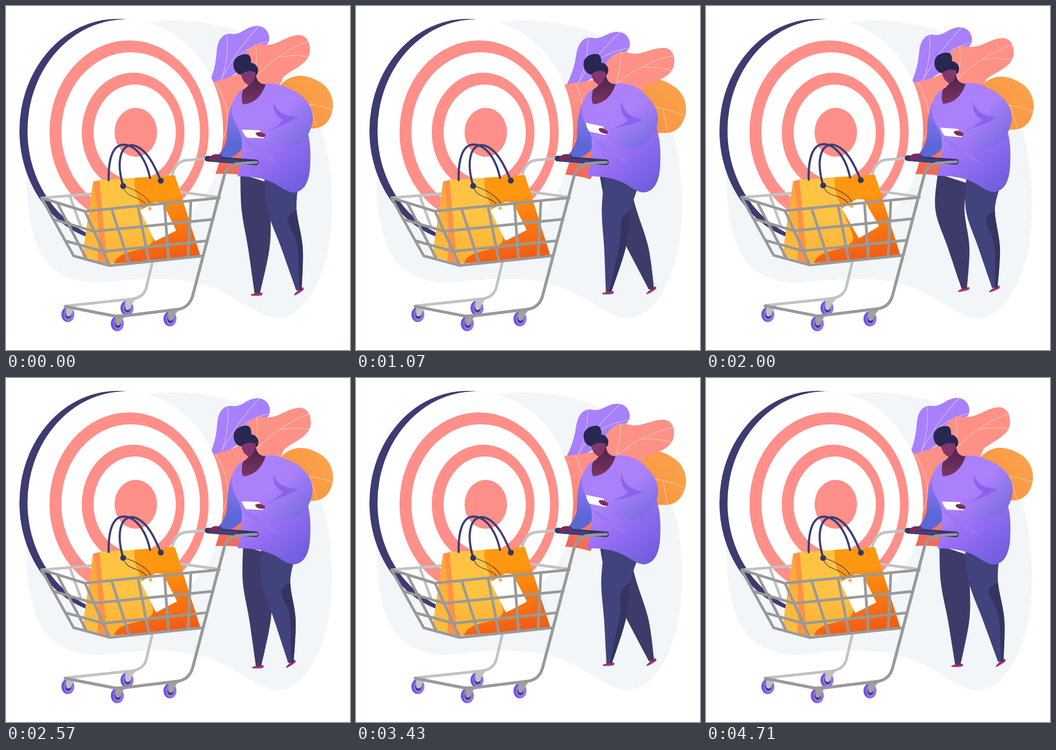
An HTML page for the animation above (4780 ms loop, 640 by 640 pixels).

```html
<!DOCTYPE html>
<html lang="en">
<head>
<meta charset="utf-8">
<title>Shopping</title>
<style>
html, body { margin: 0; width: 100%; height: 100%; overflow: hidden; background: #fff; }
svg { display: block; width: 100vw; height: 100vh; }
.line { fill: none; stroke-linecap: round; stroke-linejoin: round; }
</style>
</head>
<body>
<svg viewBox="0 0 640 640">
  <defs>
    <linearGradient id="coral" gradientUnits="userSpaceOnUse" x1="500" y1="60" x2="400" y2="315">
      <stop offset=".55" stop-color="#ff9186"/><stop offset="1" stop-color="#f2654f"/>
    </linearGradient>
    <linearGradient id="amber" x1="1" y1="0" x2="0" y2="1">
      <stop offset="0" stop-color="#fda54f"/><stop offset="1" stop-color="#f68f3a"/>
    </linearGradient>
    <linearGradient id="shirt" gradientUnits="userSpaceOnUse" x1="445" y1="190" x2="568" y2="330">
      <stop offset=".25" stop-color="#aa80fb"/><stop offset=".55" stop-color="#946df3"/><stop offset="1" stop-color="#6d5cdb"/>
    </linearGradient>
    <linearGradient id="sleeveRight" gradientUnits="userSpaceOnUse" x1="495" y1="185" x2="563" y2="250">
      <stop offset=".25" stop-color="#aa80fb"/><stop offset="1" stop-color="#776be2"/>
    </linearGradient>
    <linearGradient id="sleeveLeft" gradientUnits="userSpaceOnUse" x1="430" y1="170" x2="415" y2="255">
      <stop offset="0" stop-color="#a57dfa"/><stop offset="1" stop-color="#5c67d8"/>
    </linearGradient>
    <linearGradient id="skin" x1="0" y1="0" x2="0" y2="1">
      <stop offset="0" stop-color="#4c2147"/><stop offset="1" stop-color="#7a3565"/>
    </linearGradient>
    <linearGradient id="bagFront" x1="0" y1="0" x2="0" y2="1">
      <stop offset=".5" stop-color="#ffc343"/><stop offset="1" stop-color="#ffae31"/>
    </linearGradient>
    <linearGradient id="bagWave" x1=".3" y1="0" x2=".5" y2="1">
      <stop offset=".2" stop-color="#ff9a0d"/><stop offset="1" stop-color="#f15a15"/>
    </linearGradient>
    <linearGradient id="bagSide" x1="0" y1="0" x2="0" y2="1">
      <stop offset="0" stop-color="#ffa338"/><stop offset="1" stop-color="#ffc03f"/>
    </linearGradient>
  </defs>

  <path fill="#f2f6f9" d="M262 31C310 22 370 28 420 42C500 62 565 170 590 240C608 300 612 390 599 455C585 520 550 580 505 581C465 579 425 532 360 516C320 505 250 506 190 513C130 520 85 500 62 455C35 400 34 300 44 270Z"/>

  <g class="line" stroke-width="1.2">
    <g id="leafOrange" stroke="#fdc794">
      <path stroke="none" fill="url(#amber)" d="M500 160C520 132 545 118 585 142C606 155 611 180 607 195C602 218 588 228 568 228L500 240Z"/>
      <path d="M530 181Q570 180 607 193M565 184Q572 205 578 225"/>
    </g>
    <g id="leafPurple" stroke="#d3bcfe">
      <path stroke="none" fill="#a880fb" d="M366 172C390 120 390 105 392 85C394 60 405 50 420 52C438 54 445 39 465 37C483 36 493 52 489 66C484 80 460 80 450 95C448 112 440 118 430 124Q408 136 380 168Z"/>
      <path d="M411 54Q415 95 401 135M400 137Q430 80 470 38M427 97Q455 73 488 66"/>
    </g>
    <g id="leafCoral" stroke="#ffc3bb">
      <path stroke="none" fill="url(#coral)" d="M350 152C395 138 422 134 434 122C440 80 460 68 480 72C505 75 520 55 545 54C563 55 567 74 565 87C562 108 532 118 516 132L470 240L440 315Q415 309 360 315Z"/>
      <path d="M440 160Q495 90 562 66M508 95Q535 90 562 94M464 72Q469 100 463 130M389 142Q417 185 411 225L403 250"/>
    </g>
  </g>

  <ellipse cx="207" cy="232" rx="182" ry="208" fill="#3d3b70"/>
  <g fill="#fff">
    <ellipse cx="222" cy="232" rx="182" ry="207"/>
    <ellipse cx="229" cy="234" rx="148" ry="170" fill="#ff8f89"/>
    <ellipse cx="232" cy="234" rx="129" ry="148"/>
    <ellipse cx="236.500" cy="235" rx="95.500" ry="111" fill="#ff8f89"/>
    <ellipse cx="239.500" cy="235" rx="76.500" ry="89"/>
    <ellipse cx="241.500" cy="235" rx="39.500" ry="45.500" fill="#ff8f89"/>
  </g>

  <path id="farShoe" fill="#ad2f6c"/>
  <path id="farLeg" fill="#3e3b6b"/>
  <path id="nearShoe" fill="#ad2f6c"/>
  <path id="nearLeg" fill="#41437c"/>
  <path id="patch" fill="#343460"/>

  <g id="torso">
    <path fill="url(#sleeveLeft)" d="M436 158C411 185 412 220 411 245C408 262 400 272 393 279L410 285C425 280 436 272 439 265C441 245 440 230 436 215Z"/>
    <path fill="url(#shirt)" d="M445 153C430 160 420 175 420 195C421 215 436 230 438 245C441 270 434 295 431 317C455 317 475 319 495 328C510 335 522 347 536 347C556 345 565 325 566 295C567 270 566 255 562 238L552 190C545 165 525 148 500 145L480 144Q460 160 445 153Z"/>
    <path fill="#9a76f3" d="M440 246Q478 262 508 292Q468 280 440 246Z"/>
    <path fill="url(#skin)" d="M456 136Q452 150 441 156Q436 172 441 183Q471 181 483 146Q467 145 465 128Z"/>
  </g>
  <g id="arm">
    <path fill="url(#sleeveRight)" d="M492 147C540 148 571 178 571 208C569 234 556 262 520 262C500 261 485 252 474 242L482 236C500 228 510 220 515 210C500 195 490 170 492 147Z"/>
    <path fill="#8a62ee" d="M498 180C503 195 515 205 543 206C530 217 512 221 482 237C500 226 514 218 515 211C504 206 497 196 498 180Z"/>
    <path fill="#fff" d="M439 230L472 231L480 246L449 245Q444 243 439 230Z"/>
    <path fill="#7d2d5b" d="M464 237Q470 231 483 239L482 243Q469 246 464 237Z"/>
  </g>
  <g id="head">
    <path fill="#82376c" d="M437 126Q440 143 452 147Q462 142 465 124Q452 115 437 126Z"/>
    <path fill="#272751" d="M423 108C424 94 438 88 450 90C456 93 456 100 456 106C464 106 470 114 469 121C468 130 464 132 461 123C455 119 445 121 437 128C428 126 423 118 423 108Z"/>
    <ellipse cx="461.500" cy="126" rx="2.500" ry="4" fill="#82376c"/>
  </g>

  <g id="wheels"></g>

  <g id="cart">
    <path class="line" stroke="#c2c2c2" stroke-width="5" d="M68 357L165 349M325 346L396 356M119 354L140 412M306 345Q306 290 335 287L372 284M112 558L235 545Q258 542 262 520L272 478"/>
    <path fill="url(#bagSide)" d="M162 327L175 324L190 480L142 466Z"/>
    <path fill="#ff9145" d="M163 327L175 324L189 480L170 474Q176 400 163 327Z"/>
    <path fill="url(#bagFront)" d="M174 324L314 315L362 466L188 480Z"/>
    <path fill="url(#bagWave)" d="M239 320L314 315L362 466L201 479Q205 463 235 456C262 450 278 442 273 428C265 400 237 355 239 320Z"/>
    <path fill="#ff9710" d="M239 320L314 315L327 354Q285 362 245 358Q238 340 239 320Z"/>
    <g id="tag">
      <path class="line" stroke="#2b2a50" d="M218 334C235 340 270 355 269 374M218 336C226 362 252 350 266 377"/>
      <path class="line" style="fill:#fff" stroke="#fff" stroke-width="4" d="M252 381L278 367L290 368L314 417L278 435Z"/>
      <circle cx="268" cy="377" r="3.200" fill="#fdb934"/>
    </g>
    <g class="line" stroke="#3d3d76" stroke-width="4">
      <path d="M191 324C190 281 200 259 218 258C245 258 262 291 268 320"/>
      <path d="M218 335C205 291 212 259 235 259C262 263 278 301 288 325"/>
    </g>
    <circle cx="218" cy="335" r="5.500" fill="#343566"/>
    <circle cx="288" cy="325" r="5.500" fill="#343566"/>
    <path id="basket" class="line" stroke="#999" stroke-width="5"/>
    <path class="line" stroke="#999" stroke-width="5.500" d="M110 559L208 578L322 564Q341 560 347 540L407 312Q413 296 432 293"/>
    <path class="line" stroke="#34356a" stroke-width="10.500" d="M375 284L465 291"/>
    <path fill="#7d2b58" d="M378 285C380 276 390 274 400 277L404 281L392 285Q388 290 382 289Z"/>
    <path class="line" stroke="#3f4180" stroke-width="6" d="M391 286L430 289"/>
    <path class="line" stroke="#999" stroke-width="5" d="M426 294Q436 292 466 291"/>
  </g>
</svg>
<script>
const LOOP = 4780, FRAMES = 67, STRIDE = LOOP / 2, BOB = LOOP / 4, TAU = 2 * Math.PI;
const el = id => document.getElementById(id);
const draw = (id, d) => el(id).setAttribute('d', d);
const place = (id, transform) => el(id).setAttribute('transform', transform);
const wave = (t, period) => (1 - Math.cos(TAU * t / period)) / 2;
const lerp = (a, b, s) => a.map((v, k) => v + (b[k] - v) * s);

// A cycle with a main swing and a smaller one at double speed
const swing = (q, mean, size, peak, size2 = 0, peak2 = 0) =>
  mean + size * Math.cos(TAU * (q - peak)) + size2 * Math.cos(2 * TAU * (q - peak2));

// Bezier segments of a curve through the points
function curve(pts) {
  const at = i => pts[Math.max(0, Math.min(pts.length - 1, i))];
  return pts.slice(1).map((p, i) => {
    const o = pts[i], before = at(i - 1), after = at(i + 2);
    const c = o.map((v, k) => v + (p[k] - before[k]) / 6);
    const d = p.map((v, k) => v - (after[k] - o[k]) / 6);
    return `C${c} ${d} ${p}`;
  });
}

// Both legs walk the same cycle, half a stride apart; side is 1 for near, -1 for far
function drawLeg(name, q, side) {
  const hip = [swing(q, 488, 12, .85) + 17 * side, 312];
  const knee = [swing(q, 483, 18, .88, 7, .47) + 11 * side, 380];
  const foot = [swing(q, 504, 40, -.04, 7, .4), swing(q, 529, 3, .55, 4, .06)];
  const calf = [lerp(knee, foot, .46)[0] + 4, 450];
  const edge = dir => [[hip, 30 + 2 * side], [knee, 27], [calf, 20], [foot, 5]].map(([p, w]) => [p[0] + dir * w, p[1]]);
  const front = edge(-1), back = edge(1);
  back[0][1] += 18;
  const up = curve([...back].reverse());
  draw(name + 'Leg', `M${front[0]}${curve(front).join('')}L${back[3]}${up.join('')}Z`);
  draw(name + 'Shoe', 'M9 -2Q0 -2 -7 1Q-14 3 -11 5Q0 5 8 3Q11 0 9 -2Z');
  place(name + 'Shoe', `translate(${foot}) rotate(${swing(q, -11, -16, .03)})`);
  if (side > 0) {
    const [, top, low, end] = back, shift = (p, x, y) => [p[0] + x, p[1] + y];
    const inner = curve([top, shift(top, -17, 18), shift(low, -11, -8), shift(end, -4, 0)]);
    draw('patch', `M${top}${inner.join('')}L${end}${up[0]}${up[1]}Z`);
  }
}

function drawBasket() {
  const rim = [[66, 357], [147, 382], [397, 357]], base = [[126, 465], [193, 483], [365, 465]];
  const rows = [0, .37, .74, 1].map(s => 'M' + rim.map((p, i) => lerp(p, base[i], s)).join('L'));
  const bar = (i, s, end) => `M${lerp(rim[i], rim[i + 1], s)}L${lerp(base[i], end, s)}`;
  const posts = [0, 1, 2, 3, 4].map(k => bar(1, k * .197, [378, 463]));
  draw('basket', [...rows, ...posts, bar(0, 0, base[1]), bar(0, .36, base[1])].join(''));
}

function drawWheels() {
  el('wheels').innerHTML = [[115, 574, '#c0c0c0'], [225, 562, '#c2c2c2'], [207, 591, '#a0a0a0'], [305, 582, '#a0a0a0']]
    .map(([x, y, fork]) => `<g transform="translate(${x} ${y})">
      <ellipse rx="12" ry="14" fill="#6759cf"/><ellipse cx="2" rx="9.500" ry="13" fill="#9670f5"/>
      <ellipse cx="1" cy="1" rx="5.500" ry="6.500" fill="#34346a"/>
      <path fill="${fork}" d="M-3 -17L18 -18Q8 -8 6 1Q1 7 -3 1Z"/></g>`).join('');
}

function render(now) {
  const step = LOOP / FRAMES, t = Math.floor(now % LOOP / step) * step;
  const sway = wave(t, STRIDE), bob = wave(t, BOB), phase = t / STRIDE;
  place('leafOrange', `rotate(${5.8 * sway} 488 248)`);
  place('leafPurple', `rotate(${4.7 * sway} 339 312)`);
  place('leafCoral', `rotate(${8 * sway} 383 288)`);
  drawLeg('far', phase + .5, -1);
  drawLeg('near', phase, 1);
  place('arm', `translate(0 ${-bob}) rotate(${10.3 * sway} 505 158)`);
  place('torso', `translate(0 ${-1.5 * bob})`);
  place('head', `translate(${2.5 * bob} ${-4 * bob})`);
  place('cart', `translate(0 ${-1.5 * bob})`);
  place('tag', `rotate(${-5.5 * bob} 218 335)`);
  requestAnimationFrame(render);
}
drawBasket();
drawWheels();
render(0);
</script>
</body>
</html>
```
